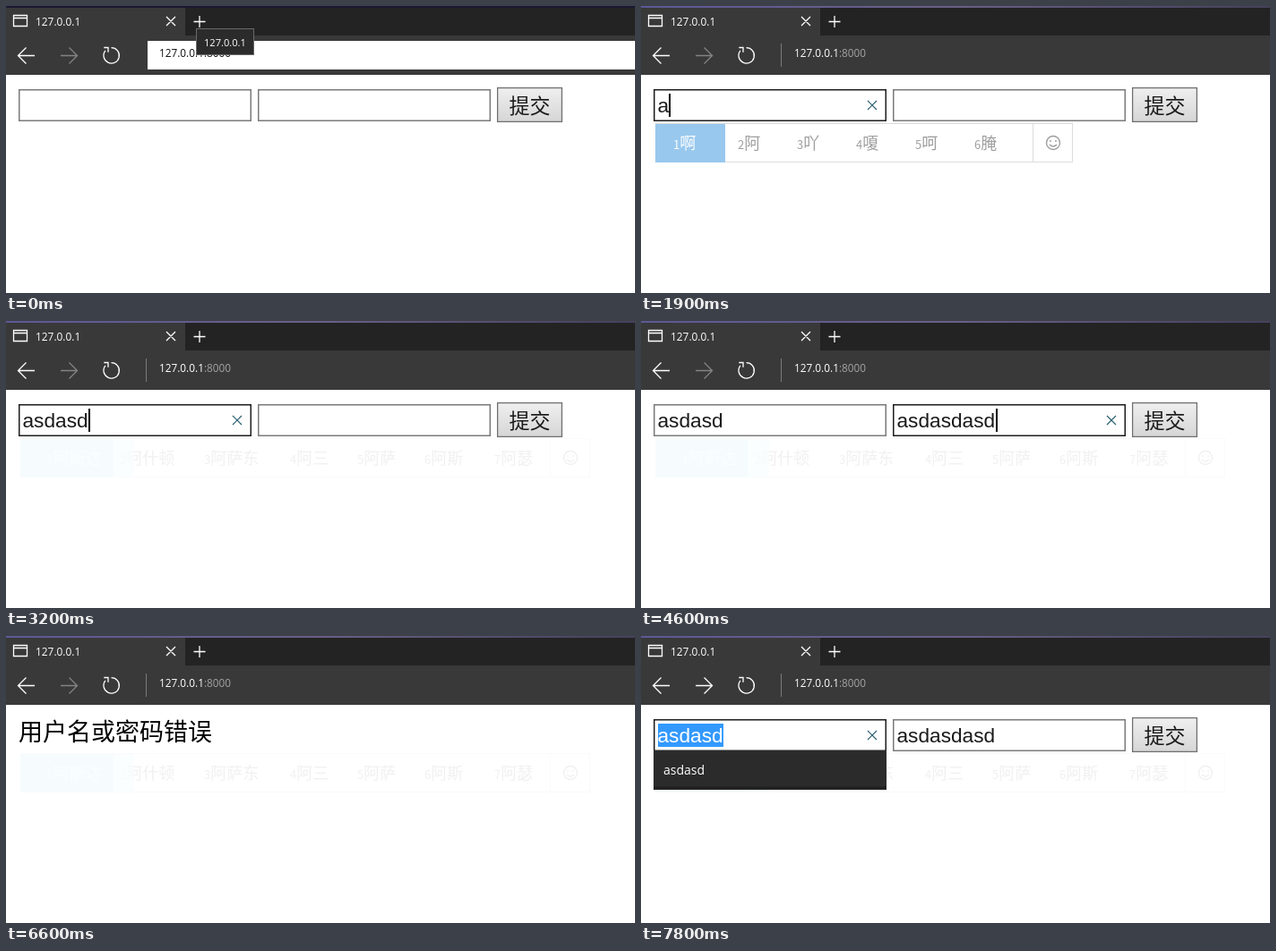
An HTML page that plays this animation: 702x321 px, repeating every 8 s.

```html
<!DOCTYPE html>
<html lang="zh">
<head>
<meta charset="utf-8">
<title>127.0.0.1</title>
<style>
  html, body { margin: 0; width: 100%; height: 100%; overflow: hidden; background: #fff; }
  svg { display: block; width: 702px; height: 321px; }
  text { white-space: pre; }
  .ui { font-family: "Open Sans", "Noto Sans", sans-serif; fill: #fff; }
  .input { font: 22.67px "Liberation Sans", Arial, sans-serif; fill: #1a1a1a; }
  .cjk { font-family: "Noto Sans CJK SC", "Noto Sans CJK", sans-serif; }
  .msg { font-size: 27px; font-weight: 300; }
  .icon { fill: none; stroke: #fff; stroke-width: 1.3; }
  .clear { fill: none; stroke: #2a6070; stroke-width: 1.2; }
  .box { fill: #fff; stroke-width: 1.5; }
</style>
</head>
<body>
<svg viewBox="0 0 702 321">
  <defs>
    <linearGradient id="face" x2="0" y2="1">
      <stop stop-color="#efefef"/><stop offset="1" stop-color="#d6d6d6"/>
    </linearGradient>
    <linearGradient id="edge">
      <stop stop-color="#5d5896"/><stop offset=".5" stop-color="#6a5f86"/><stop offset="1" stop-color="#45405c"/>
    </linearGradient>
  </defs>
  <rect width="702" height="321" fill="#fff"/>

  <g id="message">
    <text class="cjk msg" x="14" y="116.5">用户名或密码错误</text>
    <g id="marked">
      <rect x="41" y="91" width="190" height="31" fill="#39f"/>
      <text class="cjk msg" x="41" y="116.5" fill="#fff">户名或密码错误</text>
    </g>
  </g>

  <g id="form">
    <rect id="box1" class="box" x="14.75" y="93.75" width="258.5" height="34.5"/>
    <rect id="box2" class="box" x="281.75" y="93.75" width="258.5" height="34.5"/>
    <rect id="picked" x="19" y="98" width="73" height="26" fill="#39f"/>
    <text id="text1" class="input" x="18.5" y="119"></text>
    <text id="text2" class="input" x="285.5" y="119"></text>
    <path id="clear1" class="clear" d="M253 106l10 10m0-10l-10 10"/>
    <path id="clear2" class="clear" d="M520 106l10 10m0-10l-10 10"/>
    <rect id="caret1" y="98" width="2" height="26"/>
    <rect id="caret2" y="98" width="2" height="26"/>
    <rect x="548.6" y="91.6" width="71.8" height="37.8" fill="url(#face)" stroke="#707070" stroke-width="1.3"/>
    <rect id="press" x="548" y="91" width="73" height="39"/>
    <text class="cjk" x="561.5" y="119.5" font-size="23" fill="#1a1a1a">提交</text>
  </g>

  <g id="short"></g>
  <g id="long"></g>
  <rect id="haze" x="16" y="132" width="127" height="43" fill="#f9feff"/>

  <g id="history">
    <rect x="14" y="128" width="260" height="44" fill="#2b2b2b"/>
    <rect x="14" y="168" width="260" height="4" fill="#222"/>
    <text class="ui" x="25" y="155" font-size="14">asdasd</text>
  </g>

  <rect width="702" height="34" fill="#232323"/>
  <rect width="702" height="2" fill="#1c1833"/>
  <rect id="glow" width="702" height="2" fill="url(#edge)"/>
  <path d="M0 2h200v31h502v44H0z" fill="#393939"/>
  <path class="icon" d="M8.5 10.5h15v12h-15zM8.5 13.5h15M179 12l10 10m0-10l-10 10M209.5 17.5h13m-6.500-6.500v13"/>
  <text class="ui" x="33" y="22" font-size="11.9">127.0.0.1</text>
  <rect id="hover" y="33" width="44" height="44" fill="#565656"/>
  <path class="icon" d="M32 55.500H13.500M22.500 46.500l-9 9 9 9"/>
  <path id="next" class="icon" d="M61 55.500h18.500M70.500 46.500l9 9-9 9"/>
  <path class="icon" stroke-width="1.6" d="M117.500 46.700A8.700 8.700 0 1 1 111 49.800M109.300 46.500h4.700v5.200"/>
  <path d="M156.500 42v26" stroke="#7b7b7b"/>
  <text class="ui" x="171" y="57" font-size="11.8">127.0.0.1<tspan fill="#a3a3a3">:8000</tspan></text>
  <g id="address">
    <rect x="156" y="39" width="2" height="32" fill="#393939"/>
    <rect x="158" y="39" width="544" height="32" fill="#fff"/>
    <text class="ui" x="171" y="57" font-size="11.8" style="fill:#111">127.0.0.1:8000</text>
  </g>
  <g id="tip">
    <rect x="212.500" y="25.500" width="64" height="29" fill="#2b2b2b" stroke="#6a6a6a"/>
    <text class="ui" x="221" y="44.500" font-size="11.1">127.0.0.1</text>
  </g>
</svg>
<script>
const LOOP = 8000, CHAR = 12.18;
const $ = id => document.getElementById(id);

// Candidate bar: outer right edge, highlight width, [x, label] pairs
function candidates(right, mark, words) {
  const labels = words.map(([x, word], i) =>
    `<text class="cjk" x="${x}" y="160" font-size="18" fill="${i ? '#111' : '#fff'}">` +
    `<tspan font-size="13">${i + 1}</tspan>${word}</text>`).join('');
  const split = right - 44.5, cx = right - 22;
  return `<rect x="16.5" y="131.5" width="${right - 17}" height="43" fill="#fff" stroke="#aaa"/>
    <rect x="16" y="132" width="${mark}" height="43" fill="#0078d7"/>${labels}
    <path d="M${split} 132v43" stroke="#aaa"/>
    <g fill="none" stroke="#111" stroke-width="1.4"><circle cx="${cx}" cy="153" r="7.5"/>
    <path d="M${cx - 4} 155q4 4 8 0M${cx - 3} 150v2m6-2v2"/></g>`;
}
$('short').innerHTML = candidates(482, 78,
  [[36, '啊'], [108, '阿'], [174, '吖'], [240, '嗄'], [306, '呵'], [372, '腌']]);
$('long').innerHTML = candidates(652, 104,
  [[45, '阿斯达'], [127, '阿什顿'], [221, '阿萨东'], [317, '阿三'], [392, '阿萨'], [467, '阿斯'], [545, '阿瑟']]);

const start = {
  address: 1, tip: 1, glow: 0, hover: 0, next: .38,
  form: 1, message: 0, marked: 0, press: 0, picked: 0, history: 0,
  short: 0, long: 0, haze: 0,
  caret1: 0, caret2: 0, clear1: 0, clear2: 0,
  focus: 0, text1: '', text2: ''
};

// Each step changes only the listed properties
const steps = [
  [100, { address: 0, focus: 1, caret1: 1 }],
  [500, { tip: .45 }],
  [600, { tip: 0 }],
  [900, { glow: 1 }],
  [1300, { caret1: .6 }],
  [1400, { caret1: .25 }],
  [1500, { caret1: 0 }],
  [1800, { caret1: 1 }],
  [1900, { text1: 'a', clear1: 1, short: .4 }],
  [2000, { short: .8 }],
  [2100, { short: 1 }],
  [2400, { text1: '', clear1: 0, short: 0 }],
  [2600, { text1: 'asd', clear1: 1, long: .6 }],
  [2700, { text1: 'asdasd', long: 1 }],
  [2900, { long: .6 }],
  [3000, { long: .35 }],
  [3100, { long: .15 }],
  [3200, { long: .055, haze: .75 }],
  [3600, { focus: 2, caret1: 0, clear1: 0, caret2: .5 }],
  [3700, { caret2: 1 }],
  [4000, { text2: 'as', clear2: 1 }],
  [4100, { text2: 'asd' }],
  [4300, { text2: 'asda' }],
  [4400, { text2: 'asdasd' }],
  [4500, { text2: 'asdasda' }],
  [4600, { text2: 'asdasdasd' }],
  [4900, { focus: 0, caret2: 0, clear2: 0, press: .1 }],
  [5000, { press: 0 }],
  [5100, { form: .5, message: .5 }],
  [5200, { form: .15, message: .9 }],
  [5400, { form: .05, message: 1 }],
  [5500, { form: 0 }],
  [6200, { marked: 1 }],
  [6600, { marked: 0 }],
  [6800, { hover: .6 }],
  [7100, { form: 1, message: 0, next: 1 }],
  [7300, { hover: .3 }],
  [7400, { hover: 0 }],
  [7600, { focus: 1, picked: 1, clear1: 1, history: .4 }],
  [7700, { history: .8 }],
  [7800, { history: 1 }]
];

function draw(now) {
  const t = now % LOOP;
  const s = Object.assign({}, start, ...steps.filter(([at]) => at <= t).map(step => step[1]));
  for (const key in s)
    if (typeof s[key] === 'number' && key !== 'focus') $(key).setAttribute('opacity', s[key]);
  [1, 2].forEach(n => {
    const text = s['text' + n];
    $('text' + n).textContent = text;
    $('caret' + n).setAttribute('x', (n === 1 ? 19 : 286) + Math.round(text.length * CHAR));
    $('box' + n).setAttribute('stroke', s.focus === n ? '#1c1c1c' : '#7a7a7a');
  });
  $('text1').style.fill = s.picked ? '#fff' : '';
}

const begin = performance.now();
function tick() {
  draw(performance.now() - begin);
  requestAnimationFrame(tick);
}
tick();
</script>
</body>
</html>
```
